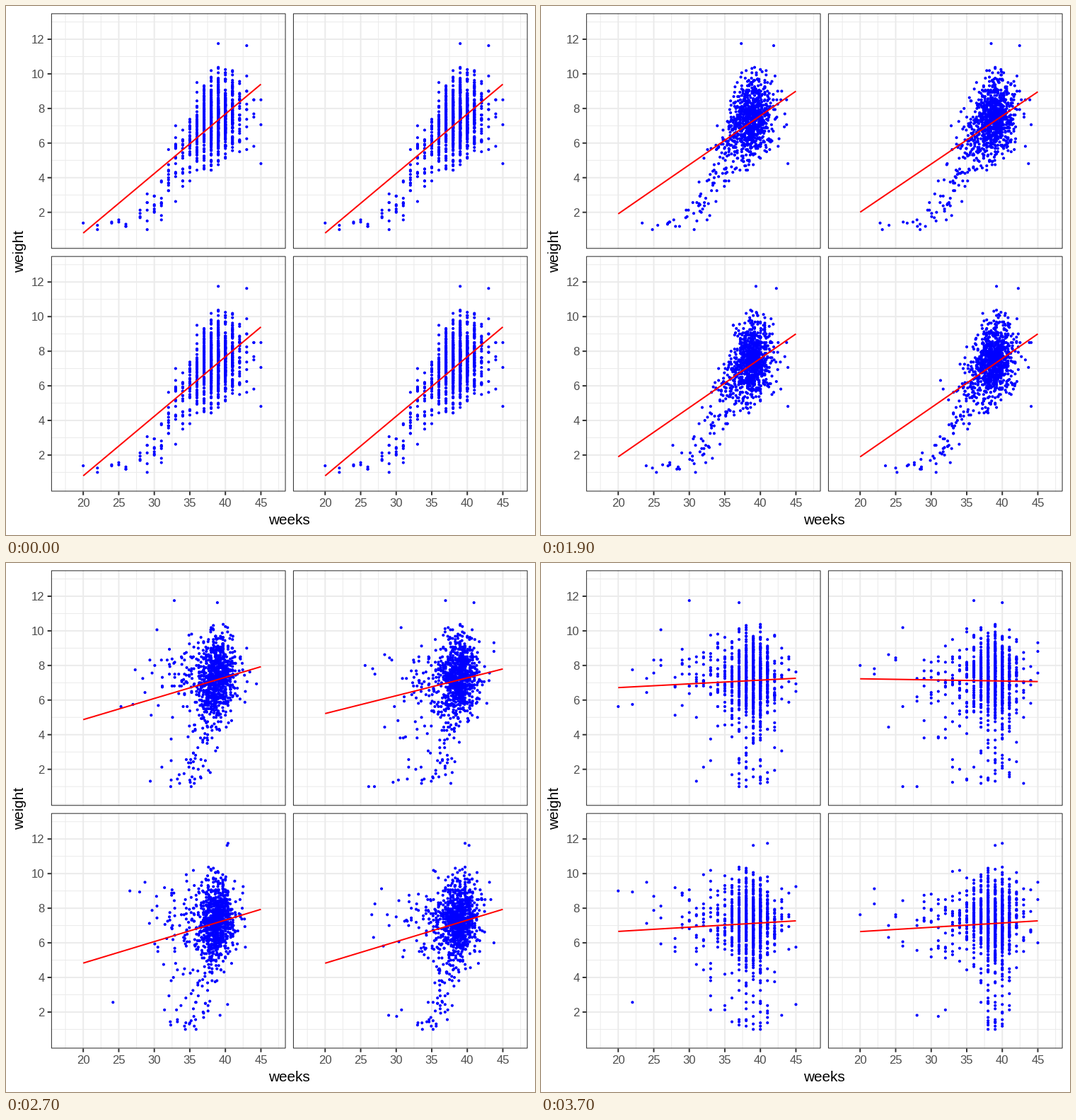
A matplotlib script for the animation above (5000 ms loop, 748 px wide and 748 px high).

```python
import matplotlib.pyplot as plt
import numpy as np
from matplotlib.animation import FuncAnimation
from matplotlib.collections import LineCollection
from matplotlib.patches import Rectangle

SIZE, DPI = 748, 100
FRAMES, HOLD, MOVE = 50, 16, 16
LEFT, TOP, GAP = 63.9, 10.4, 10.4
PANEL_W, PANEL_H = 331.65, 332.85
STEP_X, STEP_Y = PANEL_W + GAP, PANEL_H + GAP
UNIT_X, UNIT_Y = 10.05, 24.47
FONT = "Liberation Sans"
GRID, DARK, LABEL = "#ebebeb", "#333333", "#4d4d4d"

# Fitted weight at weeks 20 and 45, before and after the shuffle
LINE = np.array([0.8, 9.4])
PANELS = [
    (0, 0, (6.72, 7.26)), (1, 0, (7.23, 7.07)),
    (0, 1, (6.66, 7.27)), (1, 1, (6.65, 7.27)),
]
EXTREMES = [(20, 1.38), (22, 1.0), (39, 11.75), (43, 11.63)]
EMPTY_WEEKS = (20, 21, 23, 27)

rng = np.random.default_rng(12)


def pt(px):
    return px * 72 / DPI


def px_x(week, col):
    return 109.2 + (np.asarray(week) - 20) * UNIT_X + col * STEP_X


def px_y(weight, row):
    return 47 + (12 - np.asarray(weight)) * UNIT_Y + row * STEP_Y


def logistic(x):
    return 1 / (1 + np.exp(-x))


def births():
    """Bell of full-term births with a long early tail, on whole weeks."""
    week = np.arange(20, 46)
    count = 213 * np.exp(-((week - 39) / 1.42) ** 2 / 2)
    count += 32 * np.exp(-abs(week - 36) / 4)
    count[np.isin(week, EMPTY_WEEKS)] = 0
    weeks = np.repeat(week, np.round(count).astype(int))

    mean = 1.25 + 6.45 * logistic((weeks - 32.8) / 1.9)
    spread = 0.1 + 0.97 * logistic((weeks - 29) / 1.2)
    noise = np.clip(rng.normal(size=len(weeks)), -2.7, 2.7)
    weights = np.maximum(np.round((mean + spread * noise) * 16) / 16, 1)

    extra = np.array(EXTREMES).T
    return np.append(weeks, extra[0]), np.append(weights, extra[1])


weeks, weights = births()

fig = plt.figure(figsize=(SIZE / DPI, SIZE / DPI), dpi=DPI, facecolor="white")
ax = fig.add_axes([0, 0, 1, 1])
ax.set(xlim=(0, SIZE), ylim=(SIZE, 0))
ax.axis("off")


def segments(lines, color, width, z):
    ax.add_collection(LineCollection(
        lines, colors=color, linewidths=pt(width), zorder=z,
        capstyle="butt", snap=False), autolim=False)


def grid(col, row, xs, ys, width, z):
    x0, y0 = LEFT + col * STEP_X, TOP + row * STEP_Y
    lines = [[(x, y0), (x, y0 + PANEL_H)] for x in px_x(xs, col)]
    lines += [[(x0, y), (x0 + PANEL_W, y)] for y in px_y(ys, row)]
    segments(lines, GRID, width, z)


def label(x, y, text, size, color, ha="center", **kw):
    ax.text(x, y, text, fontsize=pt(size), color=color, family=FONT,
            ha=ha, va="baseline", **kw)


major_x, major_y = np.arange(20, 46, 5), np.arange(2, 13, 2)
minor_x, minor_y = np.arange(17.5, 48, 5), [0, *range(1, 14, 2)]
moves = []
for col, row, ends in PANELS:
    grid(col, row, minor_x, minor_y, 1, 1)
    grid(col, row, major_x, major_y, 2, 2)
    ax.add_patch(Rectangle(
        (LEFT + col * STEP_X + 0.5, TOP + row * STEP_Y + 0.5),
        PANEL_W - 1, PANEL_H - 1, fill=False, ec=DARK, lw=pt(1.05),
        zorder=6, snap=False))
    # One colour per point keeps sub-pixel positions
    cloud = ax.scatter(
        px_x(weeks, col), px_y(weights, row), s=pt(4.1) ** 2,
        c=["blue"] * len(weeks), linewidths=0, zorder=4)
    fit, = ax.plot(
        px_x([20, 45], col), px_y(LINE, row), color="red", lw=pt(2),
        solid_capstyle="butt", zorder=5, snap=False)
    moves.append((col, row, cloud, fit, rng.permutation(weeks), np.array(ends)))

bottom = TOP + STEP_Y + PANEL_H
for k in (0, 1):
    xs, ys = px_x(major_x, k), px_y(major_y, k)
    segments([[(x, bottom), (x, bottom + 5.2)] for x in xs], DARK, 2, 6)
    segments([[(LEFT - 5.2, y), (LEFT, y)] for y in ys], DARK, 2, 6)
    for x, v in zip(xs, major_x):
        label(x, 708.5, str(v), 16.65, LABEL)
    for y, v in zip(ys, major_y):
        label(54.7, y + 6, str(v), 16.65, LABEL, ha="right")
label(400.7, 733, "weeks", 20.8, "black")
label(25, 347, "weight", 20.8, "black", rotation=90, rotation_mode="anchor")


def update(i):
    t = min(max((i - HOLD) / MOVE, 0), 1)
    for col, row, cloud, fit, shuffled, ends in moves:
        x = weeks + (shuffled - weeks) * t
        cloud.set_offsets(np.column_stack([px_x(x, col), px_y(weights, row)]))
        fit.set_ydata(px_y(LINE + (ends - LINE) * t, row))


anim = FuncAnimation(fig, update, frames=FRAMES, interval=100,
                     init_func=lambda: update(0), repeat=True, repeat_delay=0)
plt.show()
```
